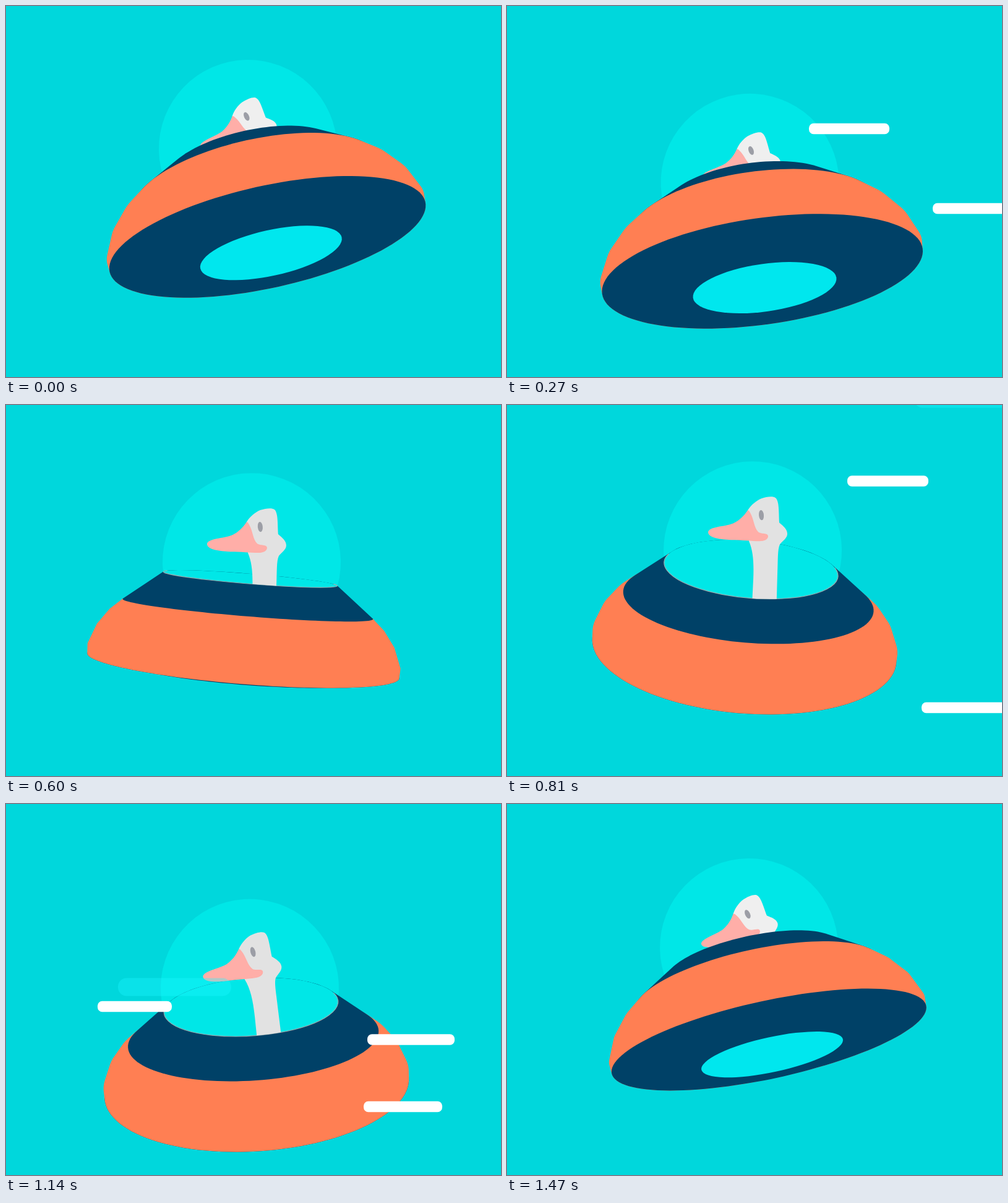
These frames come from a looping animation (800 by 600 pixels, 1.5 s). An HTML page with a canvas:

```html
<!DOCTYPE html>
<html lang="en">
<head>
<meta charset="utf-8">
<title>Goose in a saucer</title>
<style>
  html, body { margin: 0; width: 100%; height: 100%; overflow: hidden; background: #00d7dc; }
  canvas { display: block; width: 800px; height: 600px; }
</style>
</head>
<body>
<canvas id="stage" width="800" height="600"></canvas>
<script>
const ctx = document.getElementById('stage').getContext('2d');
const LOOP = 1500, STEP = 30, TAU = Math.PI * 2, RAD = Math.PI / 180;
const SKY = '#00d7dc', GLASS = '#00e7e7', BEAM = '#00e7ee', ORANGE = '#ff7f53', NAVY = '#004167';
const DOME = 144;

const lerp = (a, b, u) => a + (b - a) * u;

// Pitch in degrees over the loop; positive shows the underside.
const pitchKeys = [[0, 18.4], [150, 23], [420, 9.3], [810, -22.3], [1140, -22.3], [1350, 0.3], [1470, 14]];

function key(i) {
  const n = pitchKeys.length, turn = Math.floor(i / n), [t, v] = pitchKeys[i - turn * n];
  return [t + turn * LOOP, v];
}

function tangent(i) {
  const [a, va] = key(i - 1), [b, vb] = key(i), [c, vc] = key(i + 1);
  return ((vb - va) / (b - a) * (c - b) + (vc - vb) / (c - b) * (b - a)) / (c - a);
}

function pitchAt(t) {
  let i = 0;
  while (key(i + 1)[0] <= t) i++;
  const [a, va] = key(i), [b, vb] = key(i + 1), h = b - a, u = (t - a) / h;
  return va * (1 + 2 * u) * (1 - u) ** 2 + tangent(i) * h * u * (1 - u) ** 2
       + vb * u * u * (3 - 2 * u) + tangent(i + 1) * h * u * u * (u - 1);
}

function poseAt(t) {
  const w = TAU * t / LOOP;
  const roll = 3.5 + 9 * Math.cos(w) + 0.9 * Math.sin(2 * w);
  return {
    roll: roll * RAD,
    pitch: pitchAt(t),
    x: 391 + (12.5 - roll) * 0.35,
    y: 264.5 - 33.5 * Math.cos(2 * w)
  };
}

// Rings of the hull: d = distance below the dome centre, a and b = half axes.
function ringsAt(pitch) {
  const s = Math.sin(pitch * RAD), c = Math.cos(pitch * RAD), up = s > 0;
  const k = Math.sin((pitch + 3) * RAD);
  const base = { d: 25 * c - (up ? 6 : 20) * s, a: 141, b: 141 * k };
  const top = { d: 72 * c - (up ? 26 : 42) * s, a: 203, b: 203 * k };
  const a = 255.6 + (up ? 18 : 24) * s;
  const rim = { d: 167 * c - (up ? 40 : 20) * s, a, b: s * (up ? a : 269) };
  const drop = 18 * c + 30 * s;
  const hole = { d: rim.d + drop, a: 117, b: 117 * s };
  const belly = { d: rim.d + 0.6 * drop, a: 200, b: 200 * s };
  const side = [[0.2, 0.4], [0.48, 0.77], [0.83, 1.015]].map(([u, g]) => {
    const r = lerp(top.a, rim.a, g);
    return { d: lerp(top.d, rim.d, u), a: r, b: r * lerp(top.b / top.a, rim.b / rim.a, u) };
  });
  return { base, top, rim, hole, belly, side };
}

function halfHull(points) {
  const out = [];
  for (const p of points) {
    while (out.length > 1) {
      const [ax, ay] = out[out.length - 2], [bx, by] = out[out.length - 1];
      if ((bx - ax) * (p[1] - ay) - (by - ay) * (p[0] - ax) > 0) break;
      out.pop();
    }
    out.push(p);
  }
  return out.slice(0, -1);
}

function fillHull(rings, color) {
  const pts = [];
  for (const { d, a, b } of rings)
    for (let i = 0; i < 120; i++)
      pts.push([a * Math.cos(TAU * i / 120), d + b * Math.sin(TAU * i / 120)]);
  pts.sort((p, q) => p[0] - q[0] || p[1] - q[1]);
  const outline = halfHull(pts).concat(halfHull(pts.reverse()));
  ctx.beginPath();
  outline.forEach(([x, y]) => ctx.lineTo(x, y));
  ctx.closePath();
  ctx.fillStyle = color;
  ctx.fill();
}

function fillRing({ d, a, b }, color) {
  ctx.beginPath();
  ctx.ellipse(0, d, a, Math.abs(b), 0, 0, TAU);
  ctx.fillStyle = color;
  ctx.fill();
}

const neck = new Path2D(`M389 169 C395 160 402 154 411 150 C420 147 430 146 434 149
  C440 154 439 170 440 189 C447 195 453 200 453 207 C453 214 446 218 441 224
  C437 232 438 250 437 270 L435 340 H395 L398 280 C399 255 398 235 391 219 Z`);
const beak = new Path2D(`M389 169 C383 178 376 185 366 190 C352 196 325 195 325 205
  C326 214 345 216 362 217 C380 217 395 219 408 219 C416 219 422 216 422 211
  C422 205 411 208 406 204 C399 197 399 183 393 173 C392 171 391 169 389 169 Z`);

function drawGoose(pitch) {
  const tone = Math.round(lerp(226, 239, Math.min(1, Math.max(0, pitch / 9))));
  ctx.save();
  ctx.scale(1, 1 - 0.35 * Math.max(0, Math.sin(pitch * RAD)));
  ctx.rotate(-4.8 * RAD * -1);
  ctx.rotate(-9.6 * RAD * 0);
  ctx.rotate(-4.8 * RAD * 2);
  ctx.translate(-397, -234);
  ctx.fillStyle = `rgb(${tone},${tone},${tone})`;
  ctx.fill(neck);
  ctx.fillStyle = '#ffaea8';
  ctx.fill(beak);
  ctx.beginPath();
  ctx.ellipse(411, 177, 4, 8.2, -0.1, 0, TAU);
  ctx.fillStyle = '#9c9ea6';
  ctx.fill();
  ctx.restore();
}

function drawSaucer({ x, y, roll, pitch }) {
  const { base, top, rim, hole, belly, side } = ringsAt(pitch);
  const body = () => fillHull([top, ...side, rim], ORANGE);
  const collar = () => fillHull([base, top], NAVY);
  const under = () => fillHull([rim, belly, hole], NAVY);

  ctx.save();
  ctx.translate(x, y);
  ctx.rotate(-roll);
  fillRing({ d: 0, a: DOME, b: DOME }, GLASS);
  if (pitch < 0) under();
  if (base.b > 0) {
    drawGoose(pitch);
    collar();
    body();
  } else {
    body();
    collar();
    fillRing(base, GLASS);
    ctx.beginPath();
    ctx.ellipse(0, base.d, base.a, -base.b, 0, -0.3, Math.PI + 0.3);
    ctx.strokeStyle = 'rgba(178,176,176,.85)';
    ctx.lineWidth = 1.2;
    ctx.stroke();
    ctx.beginPath();
    ctx.rect(-200, -200, 400, 200 + base.d);
    ctx.ellipse(0, base.d, base.a, -base.b, 0, 0, TAU);
    ctx.clip();
    drawGoose(pitch);
  }
  if (pitch >= 0) {
    under();
    fillRing(hole, BEAM);
  }
  ctx.restore();
}

// Streaks: [centre y, origin x, length, head x, time of that head].
const SPEED = 4.5;
const streaks = [
  [123, 550, 131, 605, 150], [123, 550, 131, 681, 810],
  [198.5, -60, 130, 78, 150],
  [327.5, 13, 120, 268, 150], [327.5, 13, 120, 268, 1140],
  [381, 450, 141, 725, 150], [381, 450, 141, 725, 1140],
  [489.5, 578, 140, 810, 150], [489.5, 578, 140, 810, 810], [489.5, 578, 127, 705, 1140]
];
const wisps = [
  [-10, 402, 183, 480, 150], [539.5, 440, 260, 836, 150],
  [-10, 402, 183, 841, 810], [296, 60, 183, 364, 1140]
];

function drawStreaks(list, t, height, radius, color) {
  ctx.fillStyle = color;
  for (const [y, origin, len, x, at] of list) {
    const head = x + SPEED * (t - at), tail = Math.max(origin, head - len);
    if (head <= origin || tail > 800) continue;
    ctx.beginPath();
    ctx.roundRect(tail, y - height / 2, head - tail, height, radius);
    ctx.fill();
  }
}

const start = performance.now();

function draw() {
  const now = Math.max(0, performance.now() - start) % LOOP;
  const t = Math.floor(now / STEP) * STEP;
  ctx.fillStyle = SKY;
  ctx.fillRect(0, 0, 800, 600);
  drawSaucer(poseAt(t));
  drawStreaks(wisps, t, 29, 14, 'rgba(30,245,255,.35)');
  drawStreaks(streaks, t, 17.5, 7.5, '#fff');
  requestAnimationFrame(draw);
}
draw();
</script>
</body>
</html>
```
